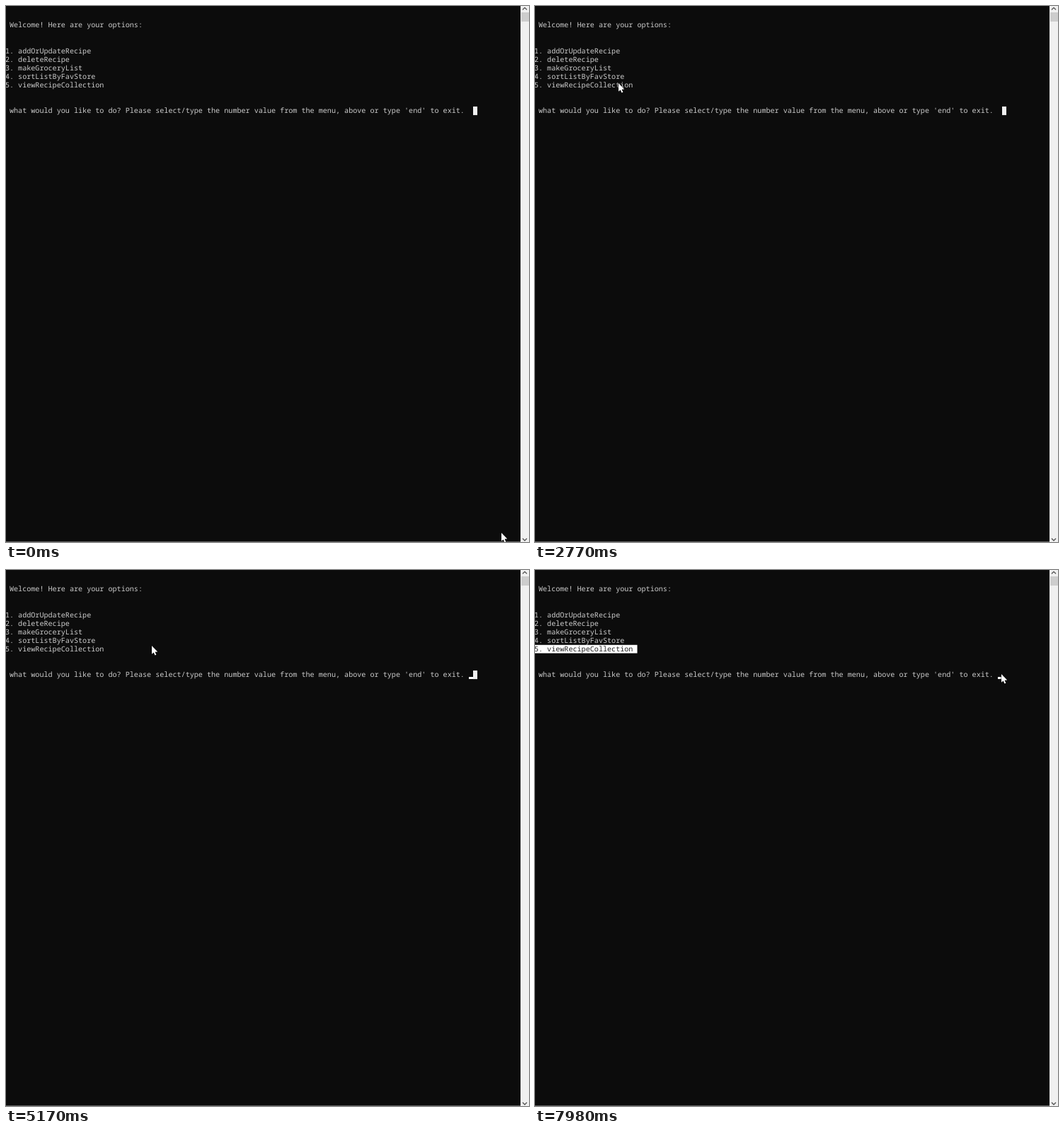
These frames come from a looping animation (739x757 px, 8000 ms). An HTML page with a canvas:

```html
<!DOCTYPE html>
<html lang="en">
<head>
<meta charset="utf-8">
<title>Recipe menu console</title>
<style>
  html, body { margin: 0; width: 100%; height: 100%; overflow: hidden; background: #0c0c0c; }
  canvas { display: block; }
</style>
</head>
<body>
<canvas id="stage" width="739" height="757"></canvas>
<script>
const ctx = document.getElementById('stage').getContext('2d');
const LOOP = 8000, STEP = 77, BLINK = 520;
const CELL = { w: 6.075, h: 12.13, x: -1.1, y: -3.6 };
const MENU_ROW = 9, PROMPT_ROW = 12, ANCHOR_COL = 24;
const MAX_GLIDE = 6;

const lines = {
  2: ' Welcome! Here are your options:',
  5: '1. addOrUpdateRecipe',
  6: '2. deleteRecipe',
  7: '3. makeGroceryList',
  8: '4. sortListByFavStore',
  9: '5. viewRecipeCollection',
  12: " what would you like to do? Please select/type the number value from the menu, above or type 'end' to exit."
};

// Places the pointer reaches, each at a step of the clock.
const stops = [
  { at: 0, x: 700, y: 744 },
  { at: 2, x: 596, y: 578 },
  { at: 11, x: 408, y: 48 },
  { at: 17, x: 96, y: 2 },
  { at: 21, x: 61, y: 70 },
  { at: 26, x: 127, y: 108 },
  { at: 31, x: 136, y: 110 },
  { at: 40, x: 68, y: 107 },
  { at: 44, x: 97, y: 106 },
  { at: 52, x: 599, y: 157 },
  { at: 56, x: 652, y: 155 },
  { at: 67, x: 206, y: 107 },
  { at: 73, x: 140, y: 110 },
  { at: 80, x: 43, y: 112 },
  { at: 84, x: 4, y: 107 },
  { at: 93, x: 580, y: 139 },
  { at: 103, x: 659, y: 147 }
];
const away = { from: 12, to: 17 };
const click = { from: 33, to: 35 };
const drag = { from: 73, to: 84 };

const during = (step, span) => step >= span.from && step < span.to;
const colX = col => CELL.x + col * CELL.w;
const rowY = row => CELL.y + row * CELL.h;
const ease = k => k * k * (3 - 2 * k);

// The pointer rests at a stop, then glides to reach the next one on time.
function pointerAt(step) {
  const i = stops.findIndex(s => s.at > step);
  if (i < 0) return stops[stops.length - 1];
  const a = stops[i - 1], b = stops[i];
  const glide = Math.min(MAX_GLIDE, b.at - a.at);
  const k = ease(Math.max(0, 1 - (b.at - step) / glide));
  return { x: Math.round(a.x + (b.x - a.x) * k), y: Math.round(a.y + (b.y - a.y) * k) };
}

// The caret blinks except while text is being selected.
function caretOn(t, step) {
  if (t < 3050 || during(step, drag)) return false;
  const start = step < drag.from ? 3050 : 6670;
  return t >= start && Math.floor((t - start) / BLINK) % 2 === 0;
}

function rect(color, x, y, w, h) {
  ctx.fillStyle = color;
  ctx.fillRect(x, y, w, h);
}

function polyline(points, close) {
  ctx.beginPath();
  points.forEach(([x, y]) => ctx.lineTo(x, y));
  if (close) ctx.closePath();
}

function drawLine(row, color) {
  ctx.fillStyle = color;
  ctx.fillText(lines[row], colX(0), rowY(row) + 9.5);
}

function drawSelection(fromCol) {
  const x = colX(fromCol), y = rowY(MENU_ROW), w = colX(ANCHOR_COL) - x;
  ctx.save();
  ctx.beginPath();
  ctx.rect(x, y, w, CELL.h);
  ctx.clip();
  rect('#fff', x, y, w, CELL.h);
  drawLine(MENU_ROW, '#222');
  ctx.restore();
}

function drawChevron(y, dir) {
  polyline([[730, y + 1.5 * dir], [733, y - 1.5 * dir], [736, y + 1.5 * dir]]);
  ctx.strokeStyle = '#505050';
  ctx.lineWidth = 1.3;
  ctx.stroke();
}

function drawScrollbar() {
  rect('#f0f0f0', 727, 0, 12, 757);
  rect('#cdcdcd', 728, 9, 11, 13);
  drawChevron(3.8, 1);
  drawChevron(753.5, -1);
}

function drawPointer({ x, y }) {
  ctx.save();
  ctx.translate(x, y);
  polyline([[0, 0], [0, 11.8], [2.7, 9.4], [4.5, 13.6], [6.4, 12.8], [4.6, 8.7], [8.3, 8.5]], true);
  ctx.strokeStyle = '#000';
  ctx.lineWidth = 1;
  ctx.stroke();
  ctx.fillStyle = '#fff';
  ctx.fill();
  ctx.restore();
}

function drawPress({ x, y }) {
  ctx.fillStyle = 'rgba(230, 220, 40, 0.6)';
  ctx.beginPath();
  ctx.arc(x, y, 9.3, 0, Math.PI * 2);
  ctx.fill();
}

function draw(t) {
  const step = Math.floor(t / STEP + 0.15);
  const pointer = pointerAt(step);
  rect('#0c0c0c', 0, 0, 739, 757);
  rect('#5a5a5a', 0, 756, 727, 1);
  ctx.font = '500 10.125px "Noto Sans Mono", "DejaVu Sans Mono", monospace';
  ctx.textRendering = 'geometricPrecision';
  Object.keys(lines).forEach(row => drawLine(row, '#ccc'));

  if (step < drag.from) {
    rect('#f2f2f2', 660, rowY(PROMPT_ROW), 6, CELL.h);
  } else {
    const col = Math.floor((pointer.x - CELL.x) / CELL.w);
    drawSelection(step < drag.to ? Math.min(col, ANCHOR_COL - 1) : 0);
  }
  if (caretOn(t, step)) rect('#fff', 654, 151, 6, 3);

  drawScrollbar();
  if (during(step, click) || during(step, drag)) drawPress(pointer);
  if (!during(step, away)) drawPointer(pointer);
}

function loop() {
  draw(performance.now() % LOOP);
  requestAnimationFrame(loop);
}
loop();
</script>
</body>
</html>
```
